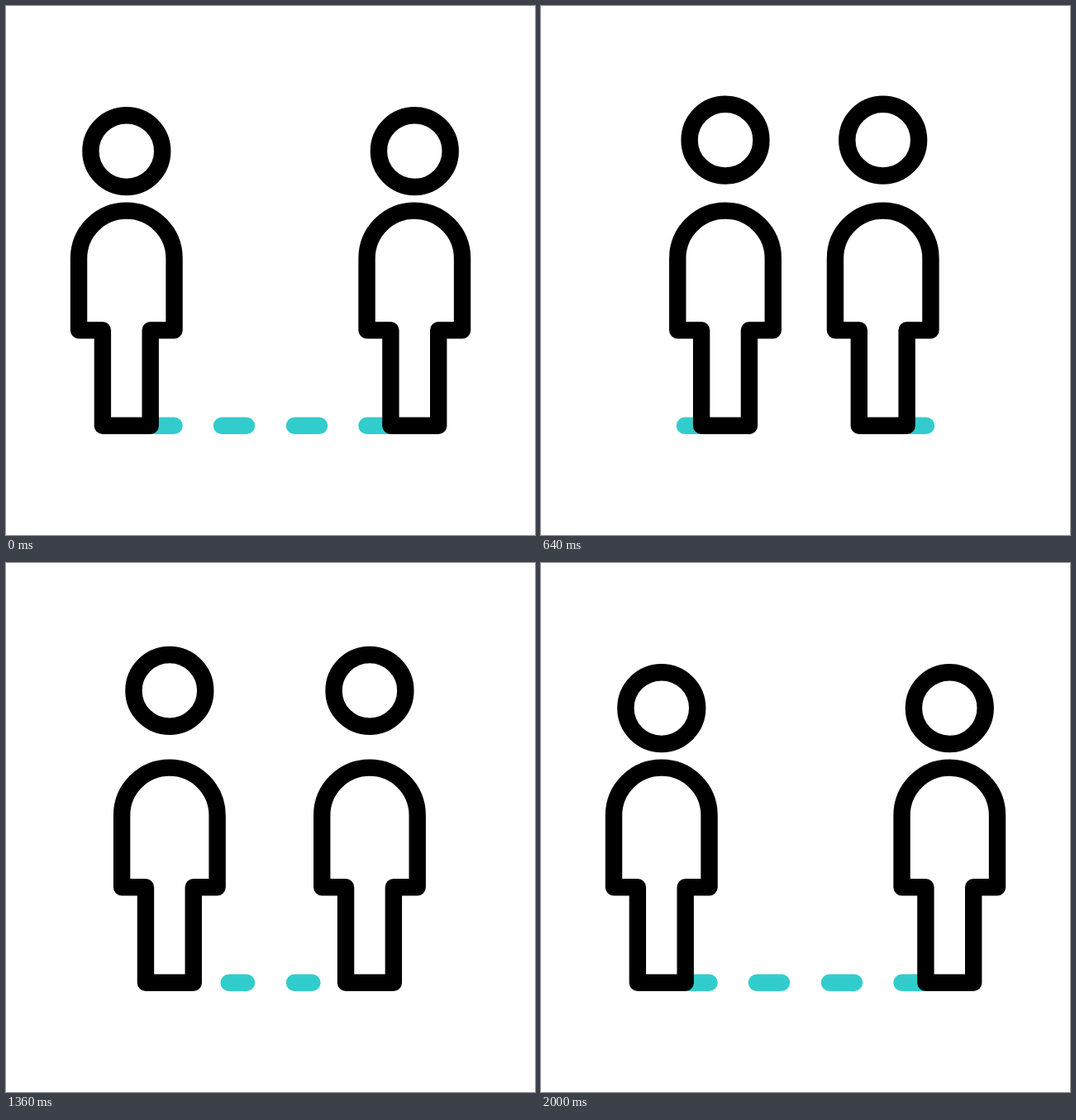
An HTML page for the animation above (2080 ms loop, 640 by 640 pixels).

```html
<!DOCTYPE html>
<html lang="en">
<head>
<meta charset="utf-8">
<title>Keeping distance</title>
<style>
  html, body { margin: 0; width: 100%; height: 100%; overflow: hidden; background: #fff; }
  svg { display: block; width: 100vw; height: 100vh; }
  .line { fill: none; stroke-width: 20.4; stroke-linecap: round; stroke-linejoin: round; }
  .person { stroke: #000; }
  #dashes { stroke: #3cc; }
</style>
</head>
<body>
<svg viewBox="0 0 640 640">
  <defs>
    <path id="body" d="M-57.75 392.2V305.4A57.75 57.75 0 0 1 57.75 305.4V392.2H28.9V507.8H-28.9V392.2Z"/>
    <circle id="head" cy="175.6" r="43.4"/>
  </defs>
  <path id="dashes" class="line"/>
  <g class="line person"><use href="#body"/><use class="head" href="#head"/></g>
  <g class="line person"><use href="#body"/><use class="head" href="#head"/></g>
</svg>
<script>
const LOOP = 2080, STEP = 40, LAST = 2000;
const CENTER = 320, FLOOR = 507.8, REACH = 146, LIFT = 22;
const people = [...document.querySelectorAll('.person')];
const heads = [...document.querySelectorAll('.head')];
const dashes = document.getElementById('dashes');

// Each entry is [time, value]; values ease in and out between entries.
const walk = [[66, 0], [832, 1], [1012, 1], [1778, 0]];
const nod = [[0, 0], [445, 1], [490, 1], [843, 0], [1260, 1], [1316, 1], [1706, 0]];
const erase = [[223, 0], [830, 1]];
const grow = [[1012, 0], [1893, 1]];

// Dash spans, measured outwards from the center.
const spans = [[29, 59], [116.5, REACH]];

function ease(keys, t) {
  if (t <= keys[0][0]) return keys[0][1];
  for (let i = 1; i < keys.length; i++) {
    const [t0, v0] = keys[i - 1], [t1, v1] = keys[i];
    if (t < t1) {
      const u = (t - t0) / (t1 - t0);
      return v0 + (v1 - v0) * u * u * (3 - 2 * u);
    }
  }
  return keys[keys.length - 1][1];
}

function dashPath(from, to) {
  let d = '';
  for (const [start, end] of spans) {
    const a = Math.max(start, from), b = Math.min(end, to);
    if (b <= a) continue;
    for (const side of [-1, 1]) d += `M${CENTER + side * a} ${FLOOR}H${CENTER + side * b}`;
  }
  return d;
}

function draw(t) {
  const near = ease(walk, t), up = -LIFT * ease(nod, t);
  people[0].setAttribute('transform', `translate(${145.8 + 91.6 * near} 0)`);
  people[1].setAttribute('transform', `translate(${494.3 - 95.6 * near} 0)`);
  heads.forEach(h => h.setAttribute('transform', `translate(0 ${up})`));
  const leaving = t < 920;
  dashes.setAttribute('d', leaving
    ? dashPath(REACH * ease(erase, t), REACH)
    : dashPath(0, REACH * ease(grow, t)));
}

const begin = performance.now();
function tick() {
  const t = Math.max(0, performance.now() - begin) % LOOP;
  draw(Math.min(LAST, Math.floor(t / STEP) * STEP));
  requestAnimationFrame(tick);
}
tick();
</script>
</body>
</html>
```
